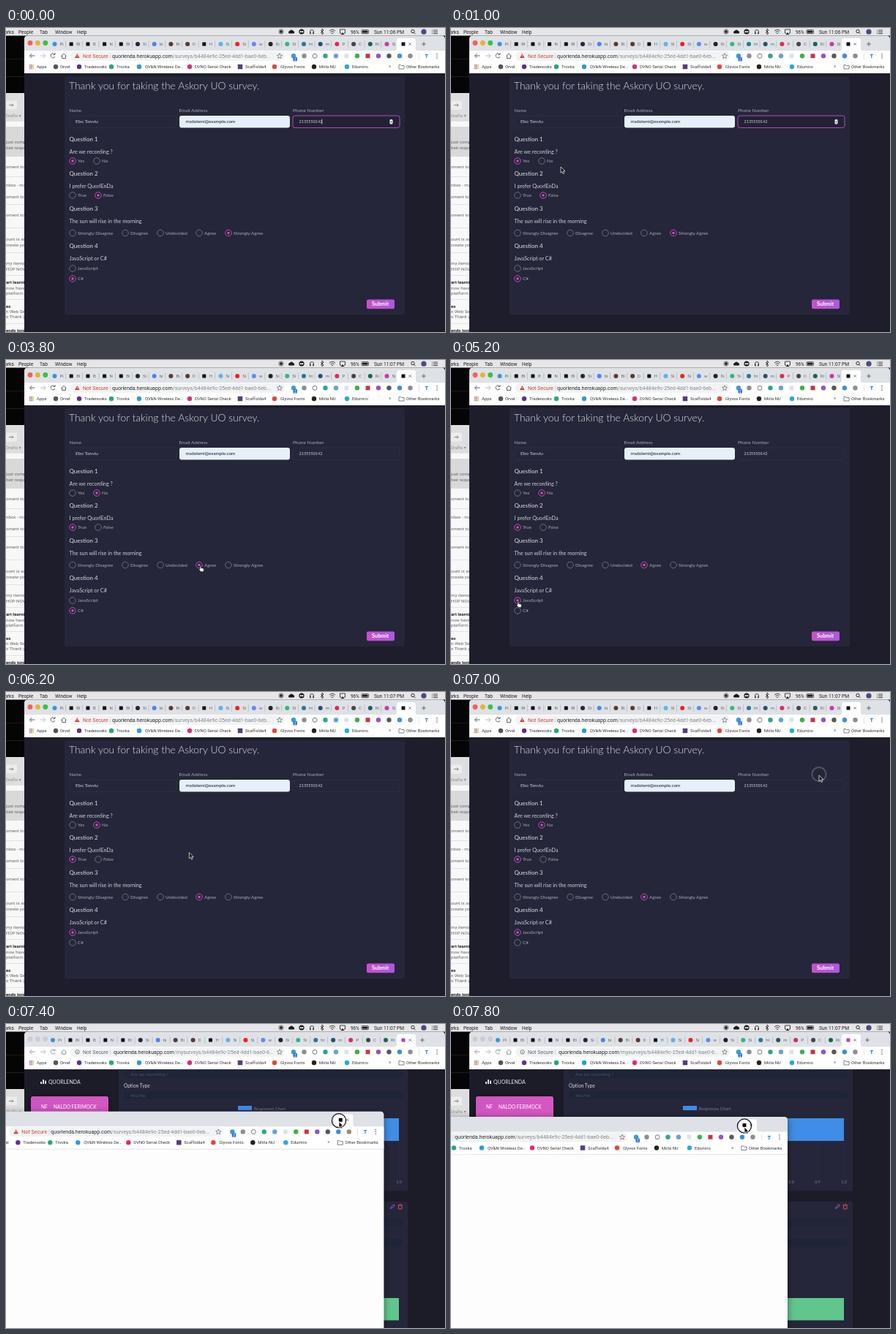
These frames come from a looping animation (600 by 416 pixels, 8 s). An HTML page:

```html
<!DOCTYPE html>
<html lang="en">
<head>
<meta charset="utf-8">
<title>Survey walkthrough</title>
<style>
  html, body { margin: 0; width: 100%; height: 100%; overflow: hidden; background: #000; }
  svg { display: block; width: 600px; height: 416px; font-family: Roboto, Arial, sans-serif; }
  .page { font-family: Lato, "Open Sans", sans-serif; }
  .ring { fill: none; stroke: #7d7d8b; stroke-width: .8; }
  .dot { fill: #d14fc6; opacity: 0; }
  .on .ring { stroke: #c04bb8; stroke-width: 1; }
  .on .dot { opacity: 1; }
  .line { fill: none; stroke: #5f6368; stroke-width: 1; }
  .menu .line { stroke: #1c1c1c; stroke-width: .8; }
</style>
</head>
<body>
<svg viewBox="0 0 600 416" id="stage"></svg>
<script>
const LOOP = 8000, STEP = 200, DETACH = 7200;

const text = (x, y, str, size, fill, extra = '') =>
  `<text x="${x}" y="${y}" font-size="${size}" fill="${fill}" ${extra}>${str}</text>`;
const rect = (x, y, w, h, fill, r = 0, extra = '') =>
  `<rect x="${x}" y="${y}" width="${w}" height="${h}" rx="${r}" fill="${fill}" ${extra}/>`;
const disc = (x, y, r, fill, extra = '') =>
  `<circle cx="${x}" cy="${y}" r="${r}" fill="${fill}" ${extra}/>`;
const line = (d, extra = '') => `<path class="line" d="${d}" ${extra}/>`;
const square = (x, y, s, fill) => rect(x - s / 2, y - s / 2, s, s, fill, .6);
const group = (id, body, extra = '') => `<g id="${id}" ${extra}>${body}</g>`;

function menuBar() {
  const dark = '#1c1c1c';
  const menus = [[-22.5, 'Bookmarks'], [17, 'People'], [46, 'Tab'], [67, 'Window'], [97, 'Help']];
  return rect(0, 0, 600, 10.5, '#e6e6e8') +
    menus.map(([x, s]) => text(x, 7.6, s, 6.6, dark)).join('') +
    disc(376, 5, 1.9, dark) + disc(376, 5, 3.1, 'none', `stroke="${dark}" stroke-width=".6"`) +
    `<path d="M387 7.5a1.8 1.8 0 0 1 .6-3.4a2.7 2.7 0 0 1 5 0a1.8 1.8 0 0 1 .6 3.4z" fill="${dark}"/>` +
    disc(404, 5, 3.6, dark) + disc(402.8, 5.2, 1.1, '#fff') + disc(405.3, 5.2, 1.1, '#fff') +
    line('M415.5 8V5a2.5 2.5 0 0 1 5 0V8M416.3 5.500v3M419.700 5.500v3') +
    line('M430 3l4 4l-2 2v-8l2 2l-4 4') +
    line('M442 4q4-3.6 8 0M443.5 5.8q2.5-2.4 5 0M445 7.5h2') +
    line('M458 7h-1.5v-5h7v5h-1.5') + `<path d="M457.500 9l2.500-3l2.500 3z" fill="${dark}"/>` +
    text(471, 7.6, '96%', 6.3, dark) +
    rect(486, 2.6, 9.5, 5, 'none', 1, `stroke="${dark}" stroke-width=".7"`) + rect(487, 3.6, 7.5, 3, dark) +
    text(503, 7.6, '', 6.65, dark, 'id="clock"') +
    disc(556, 4.5, 2.2, 'none', `stroke="${dark}" stroke-width=".9"`) + line('M557.7 6.2l2 2') +
    disc(571, 5.2, 3.6, '#4b4a86') +
    line('M582 3h1m1 0h6M582 5.3h1m1 0h6M582 7.6h1m1 0h6');
}

function mailStrip() {
  const rows = [
    [158, 'just comple'], [165.5, 'heir respons'], [192, 'oment to'], [217, 'nbox - ma'],
    [233, 'oment to'], [258, 'oment to'], [291, 'ount is set'], [298.5, 'create your'],
    [324, 'my items'], [331.5, 'HOP NOW'], [350, 'art learning', 1], [357.5, 'now have'],
    [365, 'platform. T'], [383, 'es', 1], [390, 'n Web Serv'], [397, 's Thank you'], [416, 'ends tonigh', 1]
  ];
  return rect(0, 10, 30, 80, '#050505') +
    rect(0, 42, 26, .6, '#3a2020') + rect(0, 66, 26, .6, '#333') +
    rect(0, 89, 30, 327, '#f8f8f8') + rect(0, 89, 30, 38, '#dedede') +
    rect(-3, 99.5, 18, 12, '#ececec', 2) + line('M4 105.5h6M8 103.5l2 2l-2 2', 'style="stroke:#888"') +
    text(0, 122, 'Drafts ▾', 6, '#8a8a8a') +
    rect(0, 135, 30, 41, '#d9d9d9') +
    [127, 203, 241, 273, 307, 338, 371, 404].map(y => rect(0, y, 26, .6, '#d4d4d4')).join('') +
    rows.map(([y, s, bold]) =>
      text(0, y, s, 6.2, bold ? '#222' : '#666', bold ? 'font-weight="700"' : '')).join('');
}

const tabNames = 'Pi Bl B N Bl Si bi Bi D H Si Si w Si Si ht m P C Ri Si'.split(' ');
const tabColors = ['#3a94d6', '#111', '#111', '#111', '#111', '#24292e', '#4b85ea', '#5a3b30', '#5a3b30', '#111',
  '#5bb5e8', '#f02020', '#5c8df0', '#222', '#35b67a', '#237a94', '#24516b', '#d92c58', '#444', '#1e6252', '#c83aa8'];
const addons = ['#3b9bd8', '#8b8f94', '#777', '#2fa58b', '#6c9fd8', '#dfe2e5', '#3faf48', '#c7354a',
  '#9055c9', '#55585c', '#3d8fd6', '#8b8f94'];
const bookmarks = [
  [68, 74, 'Orvel', '#555'], [100, 107, 'Tradenooks', '#60308c'], [144, 151, 'Trovka', '#25a878'],
  [182, 190, 'QV&amp;N Wireless De...', '#2b9cd8'], [251, 258, 'DVNO Serial Check', '#dc2b78'],
  [320, 327, 'Scaffolda4', '#563d7c'], [367, 375, 'Glyvox Fonts', '#e84436'],
  [421, 428, 'Mirla NU', '#252218'], [466, 473, 'Edumiro', '#27a9dc']
];

function activeTab(x, color) {
  return `<path d="M${x - 12} 31q3 0 3-3v-11q0-3 3-3h20q3 0 3 3v11q0 3 3 3z" fill="#fff"/>` +
    square(x, 22, 5, color) + line(`M${x + 7.5} 20.3l3.4 3.4m0-3.4l-3.4 3.4`, 'style="stroke-width:.8"');
}

function tabRow(first, gap, count) {
  return tabNames.slice(0, count).map((name, i) => {
    const x = first + gap * i;
    return (tabColors[i] === '#111' ? square(x, 22, 5, '#111') : disc(x, 22, 3, tabColors[i])) +
      text(x + 7, 24.2, name, 6, '#666') +
      rect(x + gap - 8, 17.5, .6, 9, '#a8abb0');
  }).join('');
}

const lights = (...colors) => colors.map((c, i) => disc(33 + 10.4 * i, 20.5, 3.4, c)).join('');
const plus = x => line(`M${x - 2.8} 22h5.6m-2.8-2.8v5.6`);

function chrome({ tabs, path, secureColor, urlX, focused }) {
  const nav = `style="stroke:${focused ? '#5f6368' : '#9a9da1'}"`;
  return `<path d="M25 62V15q0-4.5 4.5-4.5h566q4.5 0 4.5 4.5V62z" fill="#dee1e6"/>` +
    tabs + rect(25, 31, 575, 31, '#fff') +
    line('M39.5 38h-7m3-3l-3 3l3 3', nav) +
    line('M47 38h7m-3-3l3 3l-3 3', 'style="stroke:#b9bcc0"') +
    line('M66.5 36a3 3 0 1 0 .4 3M67 34v2.5h-2.5', nav) +
    line('M75.5 38.5l3.5-3.3l3.5 3.3M76.6 38v3.5h4.8v-3.5', nav) +
    rect(88, 31.8, 293, 13, '#f1f3f4', 6.5) +
    (focused ? `<path d="M94 41l3.3-6l3.3 6z" fill="${secureColor}"/>` + rect(96.9, 37.2, .8, 2, '#fff')
      : disc(97.5, 38.3, 2.7, 'none', 'stroke="#5f6368" stroke-width=".8"') + rect(97.1, 37.8, .8, 2, '#5f6368')) +
    text(105, 40.7, 'Not Secure', 7.1, secureColor) + rect(142.3, 35, .5, 7, '#b5b8bc') +
    text(urlX, 40.7, `<tspan fill="#292b2e">quorlenda.herokuapp.com</tspan>${path}`, 7.1, '#83878c') +
    line('M374 34.7l1 2.4l2.6.2l-2 1.7l.6 2.5l-2.2-1.4l-2.2 1.4l.6-2.5l-2-1.7l2.6-.2z', 'style="stroke-width:.7"') +
    addons.map((c, i) => {
      const x = 393 + 14.5 * i;
      if (i === 2) return disc(x, 38.3, 3, 'none', `stroke="${c}"`);
      return i === 5 || i === 7 ? square(x, 38.3, 6, c) : disc(x, 38.3, 3.2, c);
    }).join('') +
    rect(392.5, 40, 5.5, 5.5, '#2f6fe0', 1) + text(394, 44.7, '2', 4.8, '#fff') +
    rect(564, 34, .6, 9, '#d0d3d6') + text(572.5, 41, 'T', 7.5, '#1a73c8', 'font-weight="700"') +
    [35.5, 38.3, 41.1].map(y => disc(589, y, .8, '#5f6368')).join('') +
    [0, 1, 2, 3, 4, 5, 6, 7, 8].map(i => rect(32 + i % 3 * 2.3, 50 + (i / 3 | 0) * 2.3, 1.6, 1.6,
      ['#e55442', '#4b87ea', '#e8b63c'][i % 3])).join('') +
    text(42, 55.2, 'Apps', 5.9, '#333') +
    bookmarks.map(([ix, tx, s, c], i) =>
      (i === 5 ? square(ix, 53, 6.5, c) : disc(ix, 53, 3.2, c)) + text(tx, 55.2, s, 5.9, '#333')).join('') +
    text(523, 55, '»', 6.5, '#555') +
    line('M537 50.5h2.5l1 1h3.5v4.5h-7z', 'style="stroke-width:.8"') +
    text(547, 55.2, 'Other Bookmarks', 5.9, '#333');
}

// picks: [time, option index]
const questions = [
  { y: 152, ask: 'Are we recording ?', drop: 30, picks: [[0, 0], [1400, 1]],
    options: [[91, 0, 'Yes'], [124, 0, 'No']] },
  { y: 199, ask: 'I prefer QuorlEnDa', drop: 30, picks: [[0, 1], [2200, 0]],
    options: [[91, 0, 'True'], [126, 0, 'False']] },
  { y: 247, ask: 'The sun will rise in the morning', drop: 33.5, picks: [[0, 4], [3600, 3]],
    options: [[91, 0, 'Strongly Disagree'], [163, 0, 'Disagree'], [211, 0, 'Undecided'], [264, 0, 'Agree'], [304, 0, 'Strongly Agree']] },
  { y: 298, ask: 'JavaScript or C#', drop: 31, picks: [[0, 1], [5000, 0]],
    options: [[91, 0, 'JavaScript'], [91, 14, 'C#']] }
];

function surveyPage() {
  const soft = '#a9a9b5', pale = '#cfcfd9';
  const field = (x, w) => rect(x, 120, w, 16.5, 'none', 3, 'stroke="#2d3049" stroke-width=".8"');
  const phone = text(400.5, 130.3, '2135550142', 5.5, pale);
  return rect(25, 62, 575, 354, '#1d1d2c') + rect(80, 66, 465, 326, '#252639', 2) +
    text(86, 84, 'Thank you for taking the Askory UO survey.', 13.9, '#dcdce4', 'font-weight="300"') +
    [[86.5, 'Name'], [236.5, 'Email Address'], [392, 'Phone Number']]
      .map(([x, s]) => text(x, 115, s, 6.4, soft)).join('') +
    field(87, 146) + field(392, 146) + rect(237, 120, 151, 16.5, '#e6effb', 3) +
    text(95, 130.3, 'Ebo Tanviu', 6.5, pale) +
    text(245.5, 130.3, 'rradolemi@example.com', 6.3, '#15151d') + phone +
    group('focus', rect(392, 120, 146, 16.5, '#222235', 3, 'stroke="#b548b5" stroke-width="1"') + phone +
      rect(524.5, 125, 4, 6.5, '#eef', 1.5) + rect(526, 127.5, 1, 2, '#334')) +
    rect(431.5, 124.5, .7, 7, '#e8e8ee', 0, 'id="caret"') +
    questions.map((q, n) =>
      text(86.5, q.y + 2.8, `Question ${n + 1}`, 8, '#e2e2e9') +
      text(86.5, q.y + 19.5, q.ask, 7.25, pale) +
      q.options.map(([x, dy, label], i) => {
        const y = q.y + q.drop + dy;
        return group(`q${n}o${i}`, disc(x, y, 4.3, 'none', 'class="ring"') + disc(x, y, 1.7, '', 'class="dot"') +
          text(x + 7, y + 2.2, label, 6.3, soft));
      }).join('')).join('') +
    rect(493, 371.5, 38, 12.8, 'url(#pink)', 2) +
    text(500, 380.3, 'Submit', 7.4, '#fff', 'font-weight="700"');
}

function dashboard() {
  const dim = '#4c506c', well = '#1f2438', grey = '#777a8e';
  const row = y => rect(162, y, 380, 10.5, well, 3);
  return rect(25, 62, 575, 354, '#1c1c29') +
    [[47, 3], [50, 6], [53, 4.5]].map(([x, h]) => rect(x, 82 - h, 2, h, '#d8d8e0')).join('') +
    text(58, 81.5, 'QUORLENDA', 7, '#e6e6ec') +
    rect(34, 99, 106, 317, 'url(#rose)', 3, 'filter="url(#glow)"') +
    text(48, 115.5, 'NF', 6.6, '#fff') + text(65, 115.5, 'NALDO FERIMOCK', 6.6, '#fff') +
    rect(154, 62, 395, 166.5, '#252639') + rect(154, 243, 395, 173, '#252639', 2) +
    row(63.5) + text(170, 71.3, 'Are we recording ?', 6.4, dim) +
    text(161, 87, 'Option Type', 6.6, '#d3d3dc') +
    row(92) + text(170, 99.5, 'Yes/No', 6.4, dim) +
    rect(317, 112, 19, 6, '#3f8de6') + text(338.5, 117.5, 'Responses Chart', 6, grey) +
    [0, 1, 2, 3, 4, 5, 6, 7, 8, 9, 10].map(i => rect(177 + 36 * i, 125, .5, 85, '#2c2e43') +
      text(177 + 36 * i, 218, (i / 10).toFixed(1), 5.5, grey, 'text-anchor="middle"')).join('') +
    rect(177, 129, 360, 31, '#3f8de6') +
    line('M525.5 252.5l1-2.5l3.5-3l1.5 1.5l-3.5 3z', 'style="stroke:#9a55d8"') +
    line('M535.5 248h6.5m-5.5 0v5h4.5v-5m-3.5-1h2.5', 'style="stroke:#d8505c"') +
    row(266) + row(294) + rect(177, 375, 360, 30.5, '#60c68b');
}

const gradient = (id, a, b) =>
  `<linearGradient id="${id}"><stop stop-color="${a}"/><stop offset="1" stop-color="${b}"/></linearGradient>`;
const shadow = (id, dy, blur, opacity) =>
  `<filter id="${id}" x="-10%" y="-10%" width="120%" height="120%"><feDropShadow dx="0" dy="${dy}" stdDeviation="${blur}" flood-opacity="${opacity}"/></filter>`;

const surveyChrome = tabs => chrome({ tabs, path: '/surveys/b4484e9c-25ed-4dd1-bae0-6eb...',
  secureColor: '#d23f34', urlX: 145, focused: true });
const restTabs = (first, active) => tabRow(first, (active - first) / 20, 20) + activeTab(active, '#c83aa8') + plus(active + 26);

document.getElementById('stage').innerHTML =
  `<defs>${gradient('pink', '#c750c6', '#ad58df')}${gradient('rose', '#cf55c3', '#d657c0')}
  ${shadow('shade', 2, 5, .5)}${shadow('glow', 0, 3, .4)}</defs>` +
  mailStrip() + rect(26, 10, 574, 20, '#050505') +
  group('survey', surveyChrome(lights('#fc5b57', '#e6b32e', '#35c14a') +
    tabRow(66.5, 22.7, 21) + activeTab(543, '#111') + plus(571)) +
    `<g class="page">${surveyPage()}</g>`) +
  group('behind', chrome({
    tabs: lights('#cbcdd1', '#cbcdd1', '#cbcdd1') + group('tight', restTabs(66.5, 522)) + group('wide', restTabs(64, 543)),
    path: '/mysurveys/b4484e9c-25ed-4dd1-bae0-6...', secureColor: '#5f6368', urlX: 147, focused: false }) +
    `<g class="page">${dashboard()}</g>`) +
  group('dragged', surveyChrome(activeTab(541, '#111')) + rect(25, 62, 575, 360, '#fdfdfe') +
    rect(25, 61.5, 575, .5, '#e4e5e7'), 'filter="url(#shade)"') +
  `<g class="menu">${menuBar()}</g>` +
  group('cursor', disc(0, -1.5, 9.6, 'none', 'id="press"') +
    '<path id="arrow" d="M0 0v8.2l1.9-1.7l1.3 3l1.5-.7l-1.3-2.9h2.6z" fill="#111" stroke="#fff" stroke-width=".7"/>' +
    '<path id="hand" d="M0 0q1-1 1.7 0v2.5l3 .7q1 .4.8 1.5l-.7 3h-3.6l-2.7-3.4q0-1 1.5-.4z" fill="#fff" stroke="#111" stroke-width=".7"/>');

const $ = id => document.getElementById(id);
const show = (id, on) => { $(id).style.display = on ? '' : 'none'; };
const within = (t, a, b) => t >= a && t < b;

// time, x, y
const route = [
  [200, 512, 168], [600, 330, 194], [1000, 150, 190], [1200, 106, 188], [1400, 123, 181], [1600, 123, 181],
  [2000, 93, 231], [2400, 93, 231], [2800, 140, 250], [3600, 265, 282], [3800, 265, 282], [4200, 225, 292],
  [4800, 92, 331], [5000, 91, 331], [5200, 91, 331], [5600, 82, 334], [6000, 104, 318], [6600, 543, 23],
  [6800, 532, 58], [7000, 503, 114], [7200, 482, 130], [7800, 401, 141]
];

function pointer(t) {
  const i = Math.max(1, route.findIndex(p => p[0] >= t));
  const [t0, x0, y0] = route[i - 1], [t1, x1, y1] = route[i];
  const k = Math.max(0, (t - t0) / (t1 - t0));
  return [x0 + (x1 - x0) * k, y0 + (y1 - y0) * k];
}

function render(time) {
  const t = Math.floor(time % LOOP / STEP) * STEP;
  const detached = t >= DETACH;
  show('survey', !detached);
  show('behind', detached);
  show('dragged', detached);
  show('tight', t === DETACH);
  show('wide', t > DETACH);
  show('focus', t < 1400);
  show('caret', t < 600 || within(t, 1200, 1400));
  $('clock').textContent = t < 3000 ? 'Sun 11:06 PM' : 'Sun 11:07 PM';

  questions.forEach((q, n) => {
    const picked = q.picks.filter(p => p[0] <= t).pop()[1];
    q.options.forEach((_, i) => $(`q${n}o${i}`).setAttribute('class', i === picked ? 'on' : ''));
  });

  const k = (t - DETACH) / 600;
  $('dragged').setAttribute('transform', `translate(${-55.5 - 84.5 * k} ${105.5 + 11 * k})`);

  const [x, y] = pointer(t);
  const hand = within(t, 1400, 1800) || within(t, 2000, 2600) || within(t, 3600, 4000) || within(t, 4800, 5600);
  show('cursor', t >= 200);
  show('hand', hand);
  show('arrow', !hand);
  show('press', t >= 6600);
  $('cursor').setAttribute('transform', `translate(${x} ${y})`);
  $('press').setAttribute('stroke', detached ? '#151515' : '#515262');
  $('press').setAttribute('stroke-width', detached ? 1.3 : 2);
}

function frame() {
  render(performance.now());
  requestAnimationFrame(frame);
}
frame();
</script>
</body>
</html>
```
